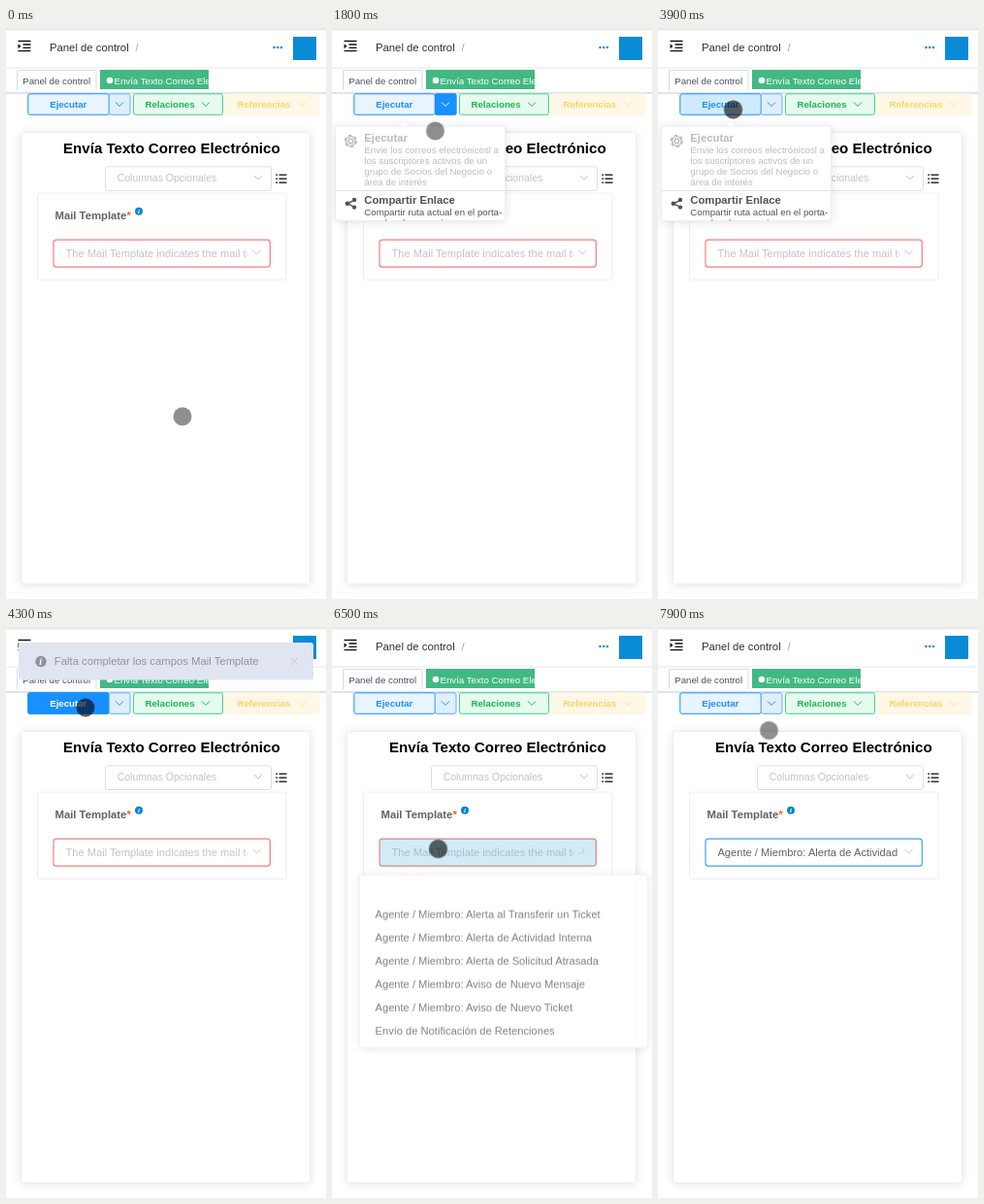
Write an HTML page that moves like this. It is 330x588 px and loops after 8 s.

```html
<!DOCTYPE html>
<html lang="es">
<head>
<meta charset="utf-8">
<title>Panel de control</title>
<style>
html, body { margin: 0; width: 100%; height: 100%; overflow: hidden; background: #fff; }
svg { display: block; width: 100%; height: 100%; font-family: "Liberation Sans", Arial, sans-serif; }
.s { font-size: 9.68px; }
.m { font-size: 11.3px; }
.field { font-size: 11.15px; }
.b { font-weight: 700; }
.line { fill: none; stroke: currentColor; }
.card { fill: #fff; stroke: #ebeef5; filter: drop-shadow(0 1px 5px rgba(0,0,0,.11)); }

/* One 8 s loop: 1% = 80 ms */
.anim { animation: 8s linear infinite; }
.hard { animation: 8s step-end infinite; opacity: 0; }

#touch { animation-name: touch; }
@keyframes touch {
  0%, 1.9% { transform: translate(182px, 400px); }
  6% { transform: translate(150px, 250px); }
  11.25% { transform: translate(102px, 74px); }
  12.5%, 18.75% { transform: translate(114px, 79px); }
  22.5%, 24% { transform: translate(106.5px, 106px); }
  30%, 32.6% { transform: translate(96px, 126px); }
  33.75% { transform: translate(80px, 100px); }
  35%, 37.6% { transform: translate(94px, 89px); }
  42.5%, 43.8% { transform: translate(78px, 87.5px); }
  48.75% { transform: translate(77.5px, 84px); }
  53.75%, 56.3% { transform: translate(82px, 83px); }
  58.75%, 60.1% { transform: translate(263px, 36px); }
  66% { transform: translate(180px, 175px); }
  71.25% { transform: translate(126.5px, 287.5px); }
  77.5%, 79% { transform: translate(111px, 238px); }
  81.25%, 82.5% { transform: translate(109.5px, 228.5px); }
  87.5%, 90% { transform: translate(112px, 326px); }
  92.5% { transform: translate(112px, 310px); }
  98.75%, 100% { transform: translate(114.5px, 106.5px); }
}

#press { animation-name: press; }
@keyframes press {
  0%, 16.25%, 53.9%, 82.5%, 91.25% { opacity: 0; }
  13.75%, 45%, 80%, 88.75% { opacity: 1; }
}

#split-on { animation-name: split; }
@keyframes split { 0%, 25% { opacity: 0; } 15% { opacity: 1; } }

#tap { animation-name: tap; }
@keyframes tap { 0%, 50% { opacity: 0; } 45% { opacity: 1; } }

#run-on { animation-name: run; }
@keyframes run { 0%, 80% { opacity: 0; } 50% { opacity: 1; } }

#menu { animation-name: menu; transform-origin: 75px 98px; }
@keyframes menu {
  0%, 15% { opacity: 0; transform: scaleY(.7); }
  18.75%, 50% { opacity: 1; transform: none; }
  53%, 100% { opacity: 0; transform: scaleY(.7); }
}

#notice { animation-name: notice; }
@keyframes notice {
  0%, 50% { opacity: 0; transform: translateY(-13px); }
  53.75%, 72.5% { opacity: 1; transform: none; }
  77.5%, 100% { opacity: 0; transform: translateY(-8px); }
}
#notice-bg { animation-name: notice-bg; }
@keyframes notice-bg {
  0%, 56.25% { fill: #e0e5f1; }
  58.75%, 100% { fill: #eaeff9; }
}

#field-tap { animation-name: field-tap; }
@keyframes field-tap { 0%, 83.75% { opacity: 0; } 80% { opacity: 1; } }

#chosen { animation-name: chosen; }
@keyframes chosen { 0% { opacity: 0; } 91.25%, 100% { opacity: 1; } }
#empty { animation-name: empty; }
@keyframes empty { 0% { opacity: 1; } 91.25%, 100% { opacity: 0; } }

#caret { animation-name: caret; transform-origin: 258.5px 231.5px; }
@keyframes caret {
  0%, 80% { transform: none; }
  83.75%, 91.25% { transform: rotate(-180deg); }
  93.75%, 100% { transform: none; }
}

#list { animation-name: list; transform-origin: 177px 255px; }
@keyframes list {
  0%, 79.9% { opacity: 0; transform: scaleY(.7); }
  81.25% { opacity: .8; transform: scaleY(.91); }
  82.5%, 91.25% { opacity: 1; transform: none; }
  95%, 100% { opacity: 0; transform: scaleY(.7); }
}
#hover { animation-name: hover; }
@keyframes hover { 0%, 95% { opacity: 0; } 86.25% { opacity: 1; } }
</style>
</head>
<body>
<svg viewBox="0 0 330 588" preserveAspectRatio="none">
  <defs>
    <path id="chev" d="M-4-2 0 2 4-2" fill="none" stroke="currentColor"/>
    <clipPath id="tab-clip"><rect x="97" y="43" width="112" height="20"/></clipPath>
    <clipPath id="field-clip"><rect x="50" y="219" width="198.5" height="26"/></clipPath>
    <clipPath id="menu-clip"><rect x="4" y="101" width="174" height="97.5"/></clipPath>
  </defs>
  <rect width="330" height="588" fill="#fff"/>

  <!-- Header -->
  <rect width="330" height="2.5" fill="#e9e9e9"/>
  <path d="M12.5 13.5h13M17.5 17h8M17.5 20.3h8M12.5 23.7h13" class="line" color="#111" stroke-width="1.3"/>
  <path d="M12.5 16.2v5l3-2.5z" fill="#111"/>
  <text class="m" x="45" y="24" fill="#303133">Panel de control</text>
  <text class="m" x="133.5" y="24" fill="#a0a4ac">/</text>
  <g fill="#1890e0">
    <circle cx="276.5" cy="20" r="1.3"/><circle cx="280.2" cy="20" r="1.3"/><circle cx="283.9" cy="20" r="1.3"/>
  </g>
  <rect x="296" y="9" width="24" height="24" fill="#0a8bd6"/>
  <path d="M0 41h330" stroke="#e6e6e9"/>

  <!-- Tabs -->
  <path d="M0 67h330" stroke="#d3dbe8" stroke-width="1.5"/>
  <path d="M11.5 64V43.5h81.500V64" class="line" color="#d8dce5"/>
  <text class="s" x="17.200" y="58" fill="#495060">Panel de control</text>
  <g clip-path="url(#tab-clip)" fill="#fff">
    <rect x="97" y="43" width="112" height="20" fill="#42b983"/>
    <circle cx="107" cy="54" r="3.300"/>
    <text class="s" x="111.500" y="58">Envía Texto Correo Electrónico</text>
  </g>

  <!-- Card -->
  <rect class="card" x="15.500" y="107.500" width="298" height="465" rx="3"/>
  <text class="b" font-size="15.100" x="59" y="129">Envía Texto Correo Electrónico</text>
  <rect x="102.500" y="142.800" width="171" height="24.700" rx="2.500" fill="#fff" stroke="#dcdfe6"/>
  <text font-size="10.490" x="114.700" y="158" fill="#c0c4cc">Columnas Opcionales</text>
  <use href="#chev" x="260" y="154" color="#c0c4cc"/>
  <path d="M281.500 151.200h8M281.500 155.200h8M281.500 159.200h8" class="line" color="#303133" stroke-width="1.600"/>
  <path d="M278.300 151.200h1.800M278.300 155.200h1.800M278.300 159.200h1.800" class="line" color="#303133" stroke-width="1.600"/>
  <rect x="32.500" y="170" width="256.500" height="89.500" rx="2.500" fill="#fff" stroke="#ebeef5"/>
  <text class="m b" x="50.500" y="197" fill="#606266">Mail Template<tspan fill="#f2602c">*</tspan></text>
  <circle cx="137" cy="188.800" r="4" fill="#0a85d1"/>
  <text x="135.900" y="191.300" font-size="7" font-style="italic" font-weight="700" fill="#fff" font-family="'Liberation Serif', serif">i</text>

  <!-- Template field -->
  <g id="empty" class="hard">
    <rect x="49" y="218.200" width="223.300" height="28" rx="3" fill="#fff" stroke="#f67c7c" stroke-width="1.200"/>
    <text class="field" x="61.400" y="236" fill="#c0c4cc" clip-path="url(#field-clip)">The Mail Template indicates the mail to send</text>
  </g>
  <g id="chosen" class="hard">
    <rect x="49" y="218.200" width="223.300" height="28" rx="3" fill="#fff" stroke="#409eff" stroke-width="1.200"/>
    <text class="field" x="61.400" y="236" fill="#606266" clip-path="url(#field-clip)">Agente / Miembro: Alerta de Actividad Interna</text>
  </g>
  <g id="caret" class="anim"><use href="#chev" x="258.500" y="231" color="#c0c4cc"/></g>
  <rect id="field-tap" class="hard" x="49" y="218" width="223" height="28" rx="3" fill="rgba(85,185,220,.27)"/>

  <!-- Action buttons -->
  <rect x="22.800" y="67.800" width="83.500" height="21.500" rx="2" fill="#e8f4ff" stroke="#1890ff"/>
  <text class="s b" x="45.200" y="82" fill="#1890ff">Ejecutar</text>
  <rect id="tap" class="hard" x="22.800" y="67.800" width="83.500" height="21.500" rx="2" fill="rgba(51,160,220,.12)"/>
  <g id="run-on" class="hard">
    <rect x="22.300" y="67.300" width="84" height="22.500" rx="2" fill="#1890ff"/>
    <text class="s b" x="45.200" y="82" fill="#fff">Ejecutar</text>
  </g>
  <rect x="106.300" y="67.800" width="21.700" height="21.500" rx="2" fill="#e0effd" stroke="#58aefb"/>
  <use href="#chev" x="117" y="78.500" color="#1890ff"/>
  <g id="split-on" class="hard">
    <rect x="106" y="67.300" width="22.500" height="22.500" rx="2" fill="#1890ff"/>
    <use href="#chev" x="117" y="78.500" color="#fff"/>
  </g>
  <rect x="131.500" y="67.800" width="92" height="21.500" rx="2" fill="#e7faf0" stroke="#3dd47f"/>
  <text class="s b" x="143.500" y="82" fill="#17b94a">Relaciones</text>
  <use href="#chev" x="206" y="78.500" color="#17b94a"/>
  <rect x="225.500" y="67.800" width="97" height="21.500" rx="2" fill="#fff8e6" stroke="#fff5db"/>
  <text class="s b" x="238.500" y="82" fill="#ffd365">Referencias</text>
  <use href="#chev" x="305" y="78.500" color="#ffe19a"/>

  <!-- Action menu -->
  <g id="menu" class="anim">
    <g class="card">
      <path d="M69 101.500l6-5 6 5z" stroke="none"/>
      <rect x="3.500" y="101" width="175" height="97.500" rx="3"/>
    </g>
    <g clip-path="url(#menu-clip)">
      <g class="line" color="#b4b7bd" stroke-width="1.300">
        <circle cx="19.300" cy="116.500" r="2.300"/>
        <circle cx="19.300" cy="116.500" r="4.800"/>
        <circle cx="19.300" cy="116.500" r="6" stroke-dasharray="3.140"/>
      </g>
      <g fill="#b9bcc2">
        <text class="m b" x="33.300" y="117">Ejecutar</text>
        <g class="s">
          <text x="33.300" y="129">Envie los correos electrónicosl a</text>
          <text x="33.300" y="140">los suscriptores activos de un</text>
          <text x="33.300" y="151">grupo de Socios del Negocio o</text>
          <text x="33.300" y="162">área de interés</text>
        </g>
      </g>
      <path d="M4 167.500h174" stroke="#dfe2e8"/>
      <path d="M23 177.300l-7 3.500 7 3.500" class="line" color="#505256" stroke-width="1.500"/>
      <g fill="#505256">
        <circle cx="15.800" cy="180.800" r="2.300"/><circle cx="23" cy="177" r="2.200"/><circle cx="23" cy="184.600" r="2.200"/>
        <text class="m b" x="33.300" y="181">Compartir Enlace</text>
        <text class="s" x="33.300" y="193">Compartir ruta actual en el porta-</text>
        <text class="s" x="33.300" y="204">papeles de su equipo</text>
      </g>
    </g>
  </g>

  <!-- Template options -->
  <g id="list" class="anim">
    <g class="card">
      <path d="M77 255.500l6-5.500 6 5.500z" stroke="none"/>
      <rect x="28.500" y="255" width="297" height="196" rx="3"/>
    </g>
    <rect id="hover" class="hard" x="29" y="313.400" width="296" height="26.200" fill="#f5f7fa"/>
    <g id="options" class="field" fill="#606266"></g>
  </g>

  <!-- Notice -->
  <g id="notice" class="anim">
    <rect id="notice-bg" class="anim" x="13" y="16" width="304" height="38.500" rx="3"/>
    <circle cx="36" cy="35.500" r="5.700" fill="#909399"/>
    <text x="34.300" y="39" font-size="10" font-style="italic" font-weight="700" fill="#fff" font-family="'Liberation Serif', serif">i</text>
    <text class="m" x="49.800" y="39.300" fill="#909399">Falta completar los campos Mail Template</text>
    <path d="M293.800 31.800l7.200 7.200m0-7.200l-7.200 7.200" class="line" color="#c0c4cc"/>
  </g>

  <!-- Touch point -->
  <g id="touch" class="anim">
    <circle r="9.500" fill="rgba(0,0,0,.44)"/>
    <circle id="press" class="hard" r="9" fill="rgba(0,0,0,.3)" stroke="rgba(60,60,60,.5)"/>
  </g>
</svg>
<script>
const topics = ["Alerta al Transferir un Ticket", "Alerta de Actividad Interna",
  "Alerta de Solicitud Atrasada", "Aviso de Nuevo Mensaje", "Aviso de Nuevo Ticket"];
const options = [...topics.map(topic => "Agente / Miembro: " + topic), "Envío de Notificación de Retenciones"];
options.forEach((label, i) => {
  const text = document.createElementNS("http://www.w3.org/2000/svg", "text");
  text.setAttribute("x", 44.5);
  text.setAttribute("y", 304.3 + i * 26.2);
  text.textContent = label;
  document.getElementById("options").append(text);
});
</script>
</body>
</html>
```
